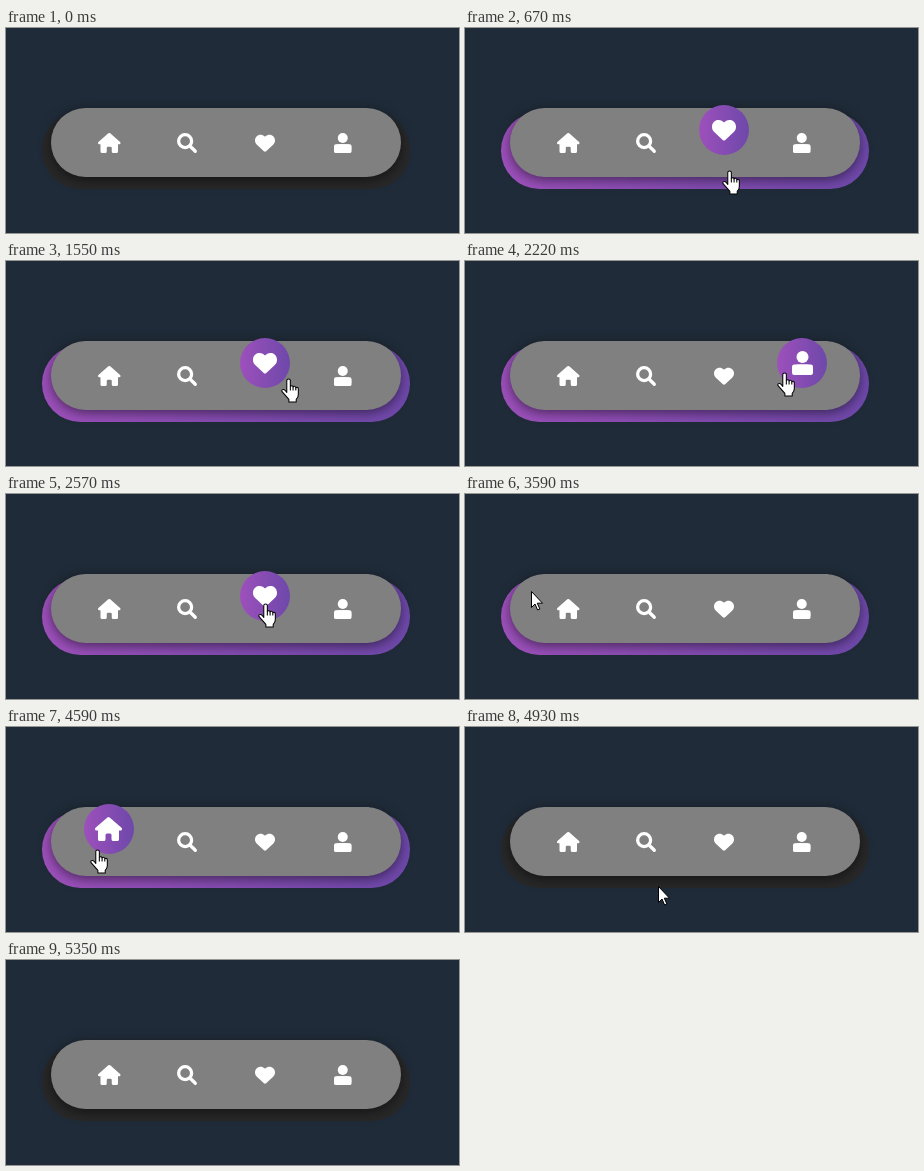
Recreate the animation shown at these times as an HTML page. Size 453 by 205 pixels, loop 5.68 s.

```html
<!DOCTYPE html>
<html lang="en">
<head>
<meta charset="utf-8">
<title>Navigation bar</title>
<style>
  html, body { margin: 0; width: 100%; height: 100%; overflow: hidden; background: #1f2b38; }
  .stage { position: relative; width: 453px; height: 205px; overflow: hidden; --glow: linear-gradient(90deg, #9d50bb, #6e48aa); }
  .back, .bar, .item, .cursor { position: absolute; }
  .back { left: 36px; top: 84px; width: 368px; height: 77px; border-radius: 39px; background: #282828; }
  .bar { left: 45px; top: 80px; width: 350px; height: 69px; border-radius: 35px; background: #808080; box-shadow: 0 3px 12px rgba(0, 0, 0, .5); }
  .on .back { background: var(--glow); }
  .item { left: calc(77.8px + var(--i) * 78.1px); top: 89.5px; width: 50px; height: 50px; border-radius: 50%; display: grid; place-items: center; }
  .item svg { height: 20px; fill: #fff; overflow: visible; }
  .item.up { top: 77px; background: var(--glow); }
  .item.up svg { height: 24px; }
  .cursor { left: 0; top: 0; overflow: visible; fill: #fff; stroke: #000; stroke-linejoin: round; }
  .cursor g { display: none; }
  .cursor .show { display: inline; }
</style>
</head>
<body>
<div class="stage">
  <div class="back"></div>
  <div class="bar"></div>
  <div class="item" style="--i:0">
    <svg viewBox="0 0 576 512"><path d="M288 0q14 0 24 8L565 231q11 10 11 24 0 32-32 32h-32v185q0 40-40 40h-80q-40 0-40-40v-88q0-32-32-32h-64q-32 0-32 32v88q0 40-40 40h-80q-40 0-40-40V287H32q-32 0-32-32 0-14 11-24L264 8q10-8 24-8z"/></svg>
  </div>
  <div class="item" style="--i:1">
    <svg viewBox="0 0 512 512"><g fill="none" stroke="#fff" stroke-width="84" stroke-linecap="round"><circle cx="208" cy="208" r="166"/><path d="M345 345L468 468"/></g></svg>
  </div>
  <div class="item" style="--i:2">
    <svg viewBox="0 0 512 512"><path d="M48 300L228 469q12 11 28 11t28-11L464 300c30-28 48-68 48-109v-6c0-70-50-130-119-141-46-8-92 7-125 40l-12 12-12-12c-33-33-79-48-125-40C50 55 0 115 0 185v6c0 41 18 81 48 109z"/></svg>
  </div>
  <div class="item" style="--i:3">
    <svg viewBox="0 0 448 512"><circle cx="224" cy="128" r="128"/><rect y="288" width="448" height="224" rx="48"/><path d="M0 430q0-142 134-142h180q134 0 134 142z" stroke="none"/></svg>
  </div>
  <svg class="cursor" width="18" height="25">
    <g class="arrow"><path d="M.5.5V16.5L4 13l2.6 6 2.3-1L6.3 12.2H11.5z"/></g>
    <g class="hand" transform="translate(-7 -.6) scale(1.05 1)">
      <path d="M5.5 14V2.2a1.7 1.7 0 0 1 3.4 0V8a1.4 1.4 0 0 1 2.6.6a1.4 1.4 0 0 1 2.6.8a1.4 1.4 0 0 1 2.4 1.2V16q0 3-2 5v2.5H7.5V21L1.2 13.5q-1-1.6.3-2.3 1.3-.5 2.4.7z"/>
      <path d="M8.9 8v4M11.5 8.6v3.4M14.1 9.4v2.6" fill="none"/>
    </g>
  </svg>
</div>
<script>
  const LOOP = 5680, STEP = 68, ENTER = 460, LEAVE = 5350;
  const origin = { x: 250, y: 205 };

  // Where the pointer comes to rest; each move starts at the previous one.
  const moves = [
    { from: ENTER, to: 740, x: 265, y: 137 },
    { from: 880, to: 880, x: 265, y: 119 },
    { from: 1550, to: 1890, x: 338, y: 113 },
    { from: 2220, to: 2570, x: 259, y: 110 },
    { from: 2840, to: 3190, x: 172, y: 108 },
    { from: 3450, to: 3590, x: 66, y: 97 },
    { from: 3790, to: 4060, x: 95, y: 108 },
    { from: 4590, to: 4800, x: 84, y: 150 },
    { from: 4870, to: 5140, x: 394, y: 175 },
    { from: 5210, to: LEAVE, x: 414, y: 190 }
  ];

  const stage = document.querySelector('.stage');
  const items = [...document.querySelectorAll('.item')];
  const cursor = document.querySelector('.cursor');
  const arrow = document.querySelector('.arrow');
  const hand = document.querySelector('.hand');

  const easeOut = p => 1 - (1 - p) ** 1.5;

  function pointerAt(time) {
    let { x, y } = origin;
    for (const move of moves) {
      if (time < move.from) break;
      const count = Math.floor((move.to - move.from) / STEP) + 1;
      const step = Math.min(count, Math.floor((time - move.from) / STEP) + 1);
      const p = easeOut(step / count);
      x += (move.x - x) * p;
      y += (move.y - y) * p;
    }
    return { x, y };
  }

  function draw(now) {
    const time = now % LOOP;
    const { x, y } = pointerAt(time);
    const visible = time >= ENTER && time < LEAVE;
    const inBar = visible && x >= 45 && x <= 395 && y >= 80 && y <= 149;
    const active = inBar ? items.findIndex((_, i) => Math.abs(x - 103 - 78 * i) <= 25) : -1;

    stage.classList.toggle('on', inBar);
    items.forEach((item, i) => item.classList.toggle('up', i === active));
    arrow.classList.toggle('show', visible && active < 0);
    hand.classList.toggle('show', active >= 0);
    cursor.style.transform = `translate(${Math.round(x)}px, ${Math.round(y)}px)`;
    requestAnimationFrame(draw);
  }
  draw(performance.now());
</script>
</body>
</html>
```
